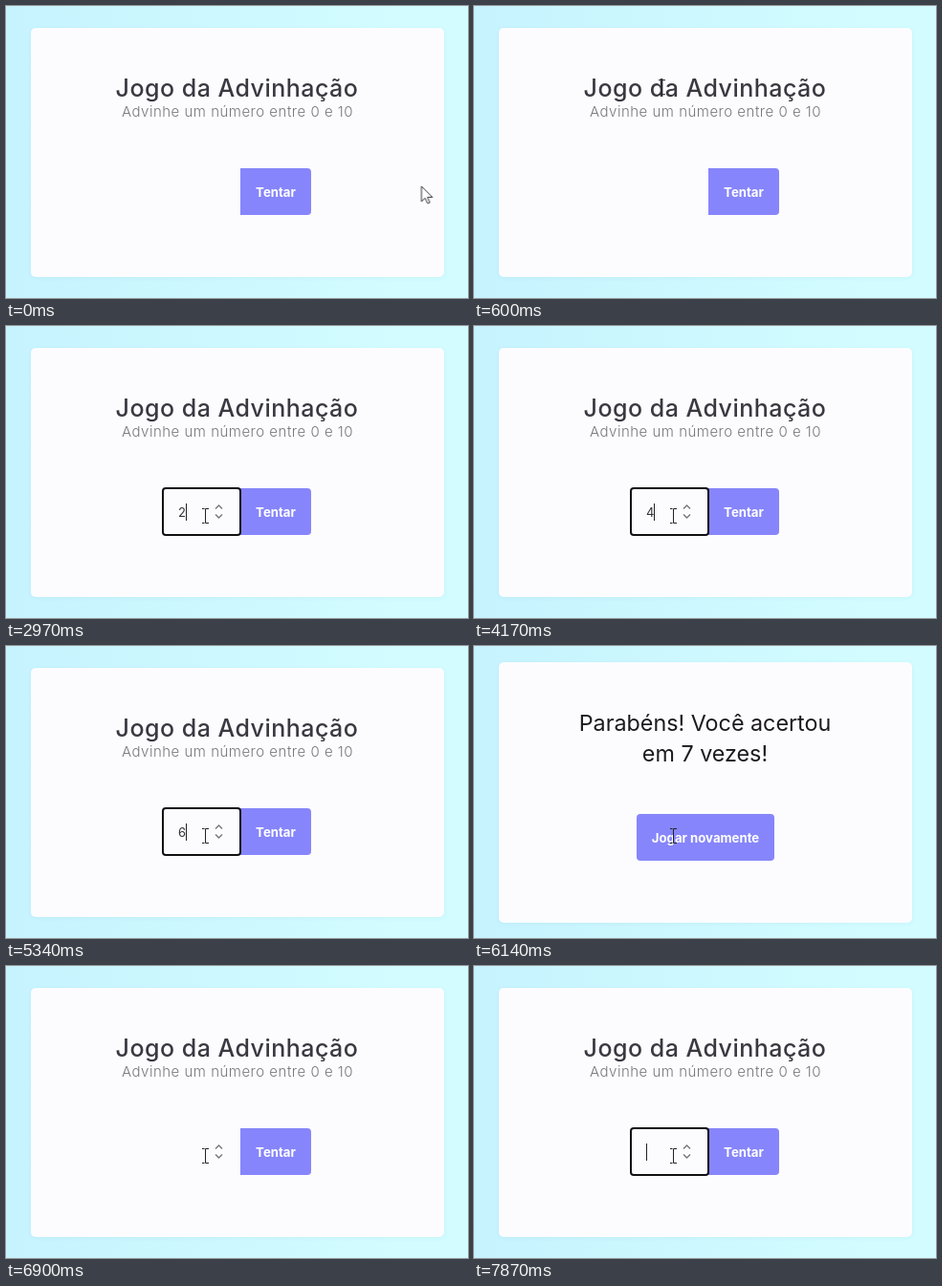
An HTML page for the animation above (8 s loop, 483 by 306 pixels).

```html
<!DOCTYPE html>
<html lang="pt">
<head>
<meta charset="utf-8">
<title>Jogo da Advinhação</title>
<style>
  html, body { margin: 0; width: 100%; height: 100%; overflow: hidden; }
  body {
    position: relative;
    background: linear-gradient(90deg, #c6f3fe, #d2fcff 85%);
    font-family: Inter, "Open Sans", sans-serif;
  }
  div, p, h1, svg { position: absolute; margin: 0; box-sizing: border-box; }

  /* every step animation shares one 8 s clock */
  .game, .win, .input, .caret, .value::before, .spin, .arrow, .beam, .hand {
    animation: 8s step-end infinite;
  }

  .card {
    left: 26px; width: 432px;
    background: #fcfcff; border-radius: 5px;
    box-shadow: 0 1px 4px rgba(60, 130, 160, .07);
  }
  .card > * { text-align: center; }
  .game { top: 23px; height: 261px; animation-name: game; }
  .win { top: 17px; height: 273px; visibility: hidden; animation-name: win; }

  h1 {
    left: 0; top: 48px; width: 431px;
    font-size: 25px; font-weight: 500; line-height: 30px;
    letter-spacing: .48px; color: #3a3840;
  }
  .hint {
    left: 0; top: 78px; width: 432px;
    font-size: 15px; font-weight: 300; line-height: 20px;
    letter-spacing: .5px; color: #77777a;
  }
  .result {
    left: 0; top: 48px; width: 431px;
    font-size: 23.3px; font-weight: 400; line-height: 32px; color: #1c1a1c;
  }
  .button {
    height: 49px; line-height: 50px;
    background: #8685fb; color: #fff;
    font-size: 13.2px; font-weight: 700;
  }
  .try { left: 219px; top: 147px; width: 74px; border-radius: 0 4px 4px 0; }
  .again {
    left: 144px; top: 159px; width: 144px; border-radius: 4px;
    animation: hover 8s linear infinite;
  }

  .input {
    left: 137px; top: 146px; width: 83px; height: 51px;
    border: 2px solid #111; border-radius: 4px; background: #fcfcff;
    opacity: 0; animation-name: focus;
  }
  .value {
    left: 15px; top: 14px; height: 20px; display: flex; align-items: center;
    font-size: 13px; line-height: 20px; color: #333;
  }
  .value::before { content: ""; animation-name: typing; }
  .caret { position: static; width: 1px; height: 18px; background: #222; animation-name: blink; }
  .spin { left: 192px; top: 163px; opacity: 0; animation-name: spin; }

  .pointer { left: 0; top: 0; width: 1px; height: 1px; overflow: visible; }
  .move { animation: move 8s linear infinite; }
  .arrow { animation-name: arrow; }
  .beam { animation-name: beam; }
  .hand { animation-name: hand; }

  @keyframes game { 0% { visibility: visible } 76.75% { visibility: hidden } 84.25% { visibility: visible } }
  @keyframes win { 0% { visibility: hidden } 76.75% { visibility: visible } 84.25% { visibility: hidden } }
  @keyframes focus { 0% { opacity: 0 } 15.75% { opacity: 1 } 76.75% { opacity: 0 } 98% { opacity: 1 } }
  @keyframes blink { 0% { opacity: 1 } 22.1% { opacity: 0 } 28.375% { opacity: 1 } }
  @keyframes spin { 0% { opacity: 0 } 12.75% { opacity: 1 } 76.75% { opacity: 0 } 85.5% { opacity: 1 } }
  @keyframes typing {
    0% { content: "" }
    32.5% { content: "1" } 34.1% { content: "" }
    37.1% { content: "2" } 40.85% { content: "" }
    43.75% { content: "3" } 48.35% { content: "" }
    51.25% { content: "4" } 54.1% { content: "" }
    57.5% { content: "5" } 61.25% { content: "" }
    64.25% { content: "6" } 70% { content: "" }
    73% { content: "7" } 76.75% { content: "" }
  }
  @keyframes hover {
    0%, 77.5% { background: #8685fb }
    80.75%, 100% { background: #6f62d8 }
  }
  @keyframes move {
    0% { transform: translate(434.5px, 189px) }
    2% { transform: translate(405px, 160px) }
    4.5% { transform: translate(305px, 100px) }
    7.5% { transform: translate(196px, 85px) }
    10.5% { transform: translate(184px, 125px) }
    12.75% { transform: translate(202px, 180px) }
    13.75%, 100% { transform: translate(208px, 199px) }
  }
  @keyframes arrow { 0% { opacity: 1 } 4.5% { opacity: 0 } 10.25% { opacity: 1 } 12.75% { opacity: 0 } }
  @keyframes beam {
    0% { opacity: 0 } 4.5% { opacity: 1 } 10.25% { opacity: 0 }
    12.75% { opacity: 1 } 77.5% { opacity: 0 } 85.5% { opacity: 1 }
  }
  @keyframes hand { 0% { opacity: 0 } 77.5% { opacity: 1 } 85.5% { opacity: 0 } }
</style>
</head>
<body>
  <div class="card game">
    <h1>Jogo da Advinhação</h1>
    <p class="hint">Advinhe um número entre 0 e 10</p>
    <div class="button try">Tentar</div>
    <div class="input"><div class="value"><div class="caret"></div></div></div>
    <svg class="spin" width="9" height="17" fill="none" stroke="#777" stroke-width="1.4">
      <path d="M1 5.5L4.5 2L8 5.5M1 11.5L4.5 15L8 11.5"/>
    </svg>
  </div>

  <div class="card win">
    <p class="result">Parabéns! Você acertou<br>em 7 vezes!</p>
    <div class="button again">Jogar novamente</div>
  </div>

  <svg class="pointer">
    <g class="move">
      <path class="arrow" d="M0 0V16L3.8 12.4L6.4 18L8.8 17L6.3 11.5H11.5Z" fill="#fff" stroke="#333"/>
      <path class="beam" fill="none" stroke="#222" d="M-3 -7.5H-.5M.5 -7.5H4M.5 -7.5V7.5M-3 7.5H-.5M.5 7.5H4"/>
    </g>
    <path class="hand" fill="#fff" stroke="#222" stroke-linejoin="round"
      d="M203.5 191.5q0-2 1.8-2t1.8 2v6q0-1.3 1.6-1.3 1.7 0 1.7 1.5 0-1 1.6-1 1.7 0 1.7 1.6 0-.8 1.4-.8 1.6 0 1.6 1.6v5q0 3-2 5v3.5h-9v-2.5q-2-2.5-4-6-1.5-2.5-3.5-4-.5-2 1.7-2 1.5.2 3 2.5l.6 1z"/>
  </svg>
</body>
</html>
```
